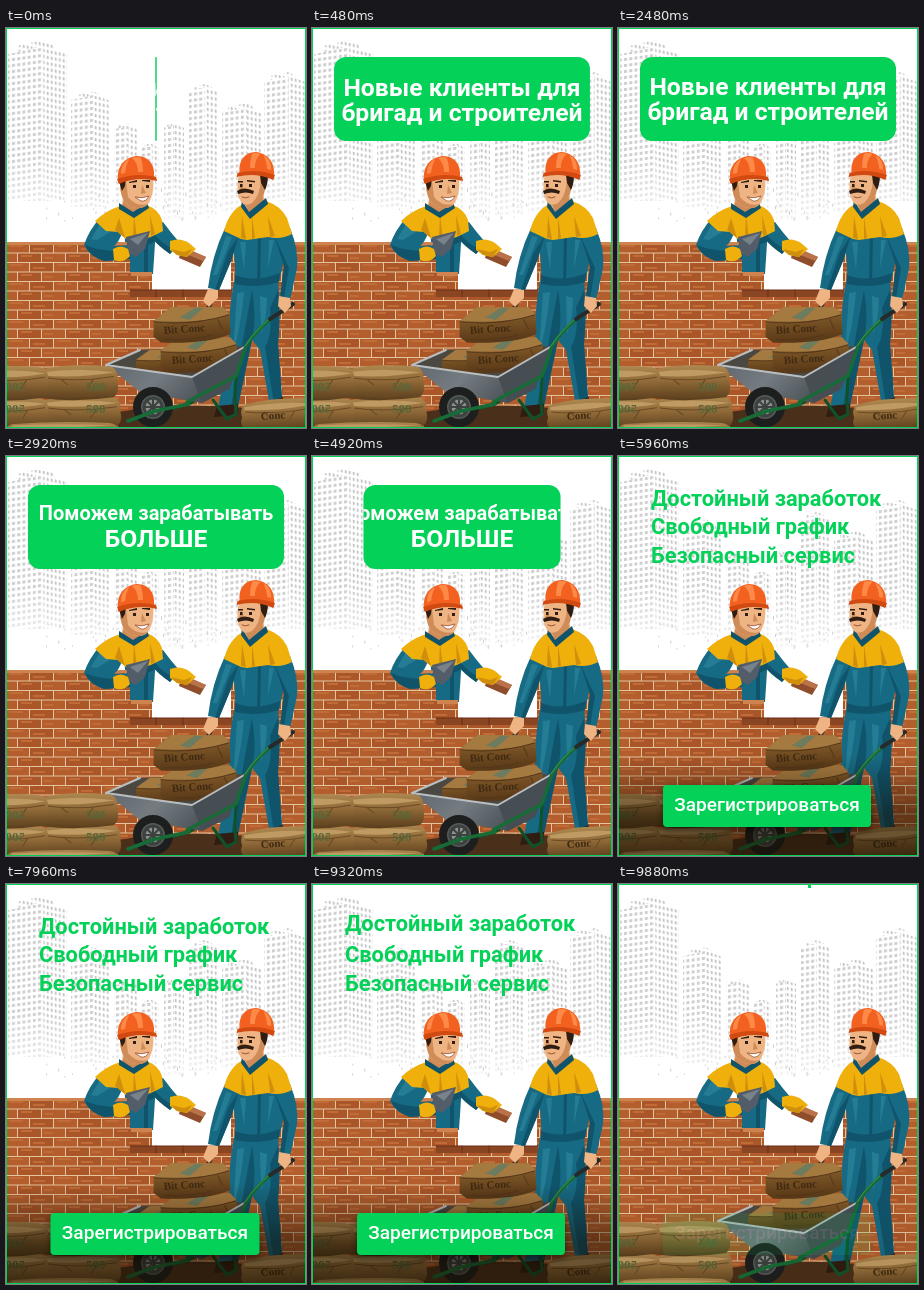
These frames come from a looping animation (300 by 400 pixels, 9920 ms). An HTML page:

```html
<!DOCTYPE html>
<html lang="ru">
<head>
<meta charset="utf-8">
<title>Новые клиенты для бригад</title>
<style>
  :root { --green: #03d158; --loop: 9920ms; }
  html, body { margin: 0; width: 100%; height: 100%; overflow: hidden; background: #fff; }
  #stage { position: relative; width: 300px; height: 400px; overflow: hidden; font: 700 21.8px/28px Roboto, sans-serif; }
  #stage > *, .strip p { position: absolute; margin: 0; white-space: nowrap; }
  svg { left: 0; top: 0; }
  .frame { inset: 0; border: 1px solid var(--green); }

  .line { left: 33px; color: var(--green); animation: line var(--loop) linear infinite backwards; }
  @keyframes line {
    0%, 51.78% { transform: translateY(335px); animation-timing-function: cubic-bezier(.333, .667, .667, 1); }
    57.83% { transform: none; animation-timing-function: linear; }
    93.3% { transform: none; animation-timing-function: cubic-bezier(.333, 0, .667, .333); }
    99.35%, 100% { transform: translateY(-245px); }
  }

  .panel { left: 22px; top: 29px; width: 256px; height: 84px; color: #fff; background: var(--green); text-align: center;
    animation: panel var(--loop) cubic-bezier(.215, .61, .355, 1) infinite; }
  @keyframes panel {
    0%, 54.23%, 100% { clip-path: inset(0 128px round 12px); visibility: hidden; }
    5.04%, 49.19% { clip-path: inset(0 0 round 12px); visibility: visible; }
  }
  .strip { height: 168px; animation: strip var(--loop) ease-in-out infinite; }
  .strip p { width: 256px; font-size: 24.7px; line-height: 25px; }
  .strip small { font-size: 20px; }
  @keyframes strip {
    0%, 24.6% { transform: none; }
    29.44%, 100% { transform: translateY(-84px); }
  }

  .shade { inset: 300px 0 0; background: linear-gradient(transparent, rgba(20, 12, 0, .5) 60%);
    animation: shade var(--loop) linear infinite; }
  @keyframes shade {
    0%, 53.02%, 100% { opacity: 0; }
    59.07%, 96.37% { opacity: 1; }
  }
  .button { left: 45px; top: 329px; width: 208px; height: 42px; border-radius: 4px; color: #fff; background: var(--green);
    font-weight: 500; font-size: 19px; line-height: 39px; text-align: center; box-shadow: 0 3px 7px rgba(0, 0, 0, .45);
    animation: button var(--loop) linear infinite; }
  @keyframes button {
    0%, 53.02% { transform: translateY(335px); animation-timing-function: cubic-bezier(.333, .667, .667, 1); }
    59.07% { transform: none; }
    79.84% { transform: none; animation-timing-function: ease-in-out; }
    81.85% { transform: scale(1.06); animation-timing-function: ease-in-out; }
    83.87%, 96.37% { transform: none; opacity: 1; }
    100% { transform: none; opacity: 0; }
  }

  .blue { fill: #176a83; } .navy { fill: #10546c; } .teal { fill: #247d94; }
  .yellow { fill: #efb00c; } .amber { fill: #cf8f0c; }
  .skin { fill: #efb483; } .tan { fill: #cf8c58; } .hair { fill: #2f1c12; }
  .hat { fill: #f2611f; } .hatDark { fill: #d04a12; } .hatLight { fill: #ff8a48; }
  .stroke { fill: none; stroke-linecap: round; stroke-linejoin: round; }
  .label { font: 700 11px "Liberation Serif", serif; fill: #3f2a12; }
  .mark { font: 700 13px "Liberation Serif", serif; fill: #55683a; }
</style>
</head>
<body>
<div id="stage">
  <svg width="300" height="400">
    <defs>
      <pattern id="win" width="5.2" height="6" patternUnits="userSpaceOnUse" patternTransform="skewY(-8)">
        <path d="M.8 1h3v3H.8z" fill="#cfcfcf"/>
      </pattern>
      <pattern id="winSide" width="4" height="6" patternUnits="userSpaceOnUse" patternTransform="skewY(12)">
        <path d="M.7 1h2v3.2H.7z" fill="#c6c6c6"/>
      </pattern>
      <linearGradient id="mist" x2="0" y2="1">
        <stop offset="0" stop-color="#fff" stop-opacity="0"/><stop offset="1" stop-color="#fff"/>
      </linearGradient>
    </defs>
    <g id="towers"></g>
    <path d="M0 130h300v75H0z" fill="url(#mist)"/>
    <g id="specks" fill="#d0d0d0"></g>
  </svg>

  <div class="line" style="top:29px">Достойный заработок</div>
  <div class="line" style="top:57px;animation-delay:140ms">Свободный график</div>
  <div class="line" style="top:86px;animation-delay:227ms">Безопасный сервис</div>

  <svg width="300" height="400">
    <defs>
      <pattern id="brick" width="48" height="19" patternUnits="userSpaceOnUse" y="215">
        <path d="M0 0h48v19H0z" fill="#e3c49c"/>
        <path d="M0 1h23v8.4H0zM0 10.5h11v8.4H0zM36 10.5h12v8.4H36z" fill="#b45e2e"/>
        <path d="M24 1h23v8.4H24zM12 10.5h23v8.4H12z" fill="#ab5629"/>
        <path d="M3 2h14v2H3zM27 5h12v2H27zM15 12h11v2H15zM38 14h9v2h-9z" fill="#bf6c39"/>
      </pattern>
      <linearGradient id="steel" x2="1" y2=".4">
        <stop offset="0" stop-color="#596067"/><stop offset=".5" stop-color="#747b81"/><stop offset="1" stop-color="#41484e"/>
      </linearGradient>
      <linearGradient id="sack" x2="0" y2="1">
        <stop offset="0" stop-color="#ae8850"/><stop offset=".45" stop-color="#906a38"/><stop offset="1" stop-color="#593d1c"/>
      </linearGradient>
      <linearGradient id="darkSack" x2="0" y2="1">
        <stop offset="0" stop-color="#91662f"/><stop offset="1" stop-color="#573717"/>
      </linearGradient>
      <g id="helmet">
        <path class="hat" d="M1 23C0 10 8 1 20 0C32 0 38 9 37 20L40 24Q22 20 1 27z"/>
        <path class="hatDark" d="M0 23Q20 16 39 21L40 25Q20 20 2 28z"/>
        <path class="hatLight" d="M15 2Q21 0 24 2Q26 8 26 16L21 16Q21 7 15 2zM6 9Q8 5 12 3Q9 9 8 17L4 18Q4 12 6 9z"/>
      </g>
      <g id="bag">
        <path d="M4 4Q30-3 56 2Q61 5 60 16Q62 27 57 31Q30 36 4 32Q-2 26 1 18Q-1 8 4 4z" fill="url(#sack)"/>
        <path d="M3 7Q30 2 58 7Q32 13 3 10z" fill="#bf9a62"/>
        <path class="stroke" d="M4 12Q30 17 57 11M10 28Q28 32 48 28M18 14l5 5M42 14l-4 8" stroke="#6b4b25"/>
      </g>
      <g id="crate">
        <path d="M2 14L20 1L72 4L78 11L78 31Q54 40 8 36L1 30z" fill="url(#darkSack)"/>
        <path d="M2 14L20 1L72 4L78 11Q55 20 2 14z" fill="#a57a40"/>
        <path class="stroke" d="M2 15Q40 21 77 12M12 33Q40 36 60 31M66 16l4 10" stroke="#54371a"/>
        <path d="M28 12L44 3L52 4L38 15z" fill="#6d7b5e"/>
      </g>
    </defs>

    <!-- left mason, behind the wall -->
    <path class="blue" d="M118 202L150 200L147 246H122z"/>
    <path class="navy" d="M118 206Q134 218 149 206L148 214Q134 222 121 215zM138 216h4v30h-4z"/>
    <path d="M0 215H124V244H146V262H225V215H300V400H0z" fill="url(#brick)"/>
    <path d="M0 214H123V217H0zM284 214H300V217H284zM125 244H146V248H125z" fill="#cf8450"/>
    <path d="M124 262H226V269H124z" fill="#8a4522"/>
    <path class="stroke" d="M124 262H226M150 262v7M177 262v7M204 262v7" stroke="#6d2d18"/>
    <g>
      <path class="skin" d="M118 168L142 172L141 184L128 190L115 180z"/>
      <path class="tan" d="M118 170Q128 182 142 177L140 184L127 187L116 180z"/>
      <path class="blue" d="M94 190L116 205Q113 214 108 218L126 217L124 231L98 233Q83 228 78 217Q83 202 94 190z"/>
      <path class="navy" d="M79 217Q98 225 125 222L124 231L98 233Q83 228 79 217z"/>
      <path class="teal" d="M94 196L104 204L91 212L85 211z"/>
      <path class="blue" d="M145 196L157 194Q165 205 174 215L164 226Q153 216 145 208z"/>
      <path class="navy" d="M146 203Q156 217 168 221L164 226Q152 218 146 210z"/>
      <path class="yellow" d="M89 193Q99 183 114 178L127 185L141 177Q153 182 156 192L157 203L149 207Q136 214 120 211L112 204L100 203z"/>
      <path class="amber" d="M113 190L119 210L115 207L109 202zM144 187L149 206L145 208zM128 187L131 211L127 211z"/>
      <path class="navy" d="M113 175L127 184L141 175L143 180L128 190L113 181z"/>
      <path class="skin" d="M114 152Q113 170 122 177Q131 183 140 178Q149 169 147 148L118 145z"/>
      <path class="tan" d="M114 155L120 153L122 169Q130 179 142 176Q133 184 122 177Q114 171 114 155zM136 157l4 8l-5 1z"/>
      <path class="hair" d="M112 150L120 149L119 158L116 163zM123 154l8-2v2l-8 1zM136 152l8 0v2l-8-1zM127 157h3v3h-3zM140 157h3v3h-3z"/>
      <path d="M129 169Q136 171 143 168Q140 174 135 173z" fill="#fff" stroke="#9b5033" stroke-width=".8"/>
      <use href="#helmet" x="111" y="128"/>
      <path d="M120 209L144 203L139 221L130 229L122 225z" fill="#535d69"/><path d="M124 211L142 205L132 217z" fill="#78828b"/>
      <path class="yellow" d="M107 221Q115 216 122 221L124 228Q117 236 108 232z"/>
      <path d="M176 219L200 229L194 239L173 230z" fill="#8f4d2c"/><path d="M178 219L200 229L197 233L175 224z" fill="#b97249"/>
      <path class="yellow" d="M164 213Q174 209 183 215L190 221L181 229L171 227L164 222z"/>
      <path class="amber" d="M165 221L178 224L186 221L181 229L171 227z"/>
    </g>

    <path d="M112 384Q170 374 240 380V400H112z" fill="#4a2f1a"/>

    <!-- right worker -->
    <g>
      <path class="blue" d="M229 250L272 250Q275 284 272 316L276 370L264 378L254 322L246 312L232 378L212 380L223 322Q222 280 229 250z"/>
      <path class="navy" d="M246 262Q251 292 246 312L232 378L225 379L238 306zM264 280Q267 306 259 319L268 376L276 370L272 316Q275 283 272 262z"/>
      <path class="teal" d="M231 265L238 264Q235 299 227 325zM254 268L261 270Q261 290 255 306z"/>
      <path class="hair" d="M211 378L232 376L231 387L208 389zM264 374L277 369L277 381L262 384z"/>
      <path class="blue" d="M225 196L280 194Q282 216 273 254Q252 261 229 256Q230 235 225 196z"/>
      <path class="navy" d="M252 208L255 208L254 258L251 258zM229 247Q250 255 274 245L273 254Q252 261 229 256z"/>
      <path class="teal" d="M234 214L240 214L238 242zM263 212L268 212L262 240z"/>
      <path class="skin" d="M237 168L257 164L260 178L243 188z"/><path class="tan" d="M239 174L257 169L257 178L243 185z"/>
      <path class="blue" d="M219 200L235 204L225 233L213 262L202 260Q206 227 219 200z"/>
      <path class="teal" d="M220 208L226 209L211 247L207 247z"/>
      <path class="navy" d="M233 207L225 233L213 262L209 262L222 224z"/>
      <path class="blue" d="M268 202L284 200Q293 222 291 240L284 272L274 270L278 238z"/>
      <path class="navy" d="M268 207L278 238L274 270L278 271L283 240z"/>
      <path class="yellow" d="M218 203Q223 183 237 176L243 186L260 173Q275 178 281 190L286 206Q275 212 262 209L241 212L235 211z"/>
      <path class="amber" d="M236 188L240 211L235 210zM262 188L269 208L264 209zM246 188L249 210L246 211z"/>
      <path class="navy" d="M236 172L243 184L260 170L262 176L244 191L235 179z"/>
      <path class="skin" d="M232 150Q230 167 235 174Q242 181 250 176Q259 167 261 147L240 143z"/>
      <path class="tan" d="M261 150L255 152Q254 168 246 175Q241 178 237 176Q244 182 251 176Q260 168 261 150zM236 155l-3 7l5 1z"/>
      <path class="hair" d="M262 147L254 147L255 155L259 162Q262 156 262 147zM231 163Q238 158 248 163L247 166Q240 163 232 166zM232 153l5 0v1.5l-5 0zM241 152l8 1v1.5l-8-1zM234 156h2.5v3H234zM243 156h3v3h-3z"/>
      <path class="stroke" d="M236 169Q239 171 243 169" stroke="#9b5033"/>
      <use href="#helmet" transform="translate(269 124) scale(-.96 1)"/>
    </g>

    <!-- barrow -->
    <path class="stroke" d="M208 270L196 290" stroke="#252a2b" stroke-width="4"/>
    <path class="skin" d="M202 261L212 262L212 270L203 279L197 273z"/>
    <path class="stroke" d="M236 325Q226 355 230 386L221 391L207 372M122 393L183 376L215 358" stroke="#0f5229" stroke-width="3"/>
    <path d="M100 337L134 322L240 318L222 361L195 374L134 362z" fill="#4b4842"/>
    <g transform="translate(128 322) rotate(-3) scale(.8 .7)"><use href="#crate"/></g>
    <g transform="translate(152 309) rotate(-3)"><use href="#crate"/></g>
    <g transform="translate(145 279) rotate(-3)"><use href="#crate"/></g>
    <text class="label" transform="translate(158 306) rotate(-4)">Bit Conc</text>
    <text class="label" transform="translate(166 336) rotate(-4)">Bit Conc</text>
    <path d="M100 337L186 349L240 318L223 361L196 375L134 364z" fill="url(#steel)"/>
    <path d="M186 349L240 318L223 361L196 375z" fill="#464d53"/>
    <path class="stroke" d="M134 322L100 337L186 349L240 318" stroke="#b9bec0" stroke-width="2"/>
    <path class="stroke" d="M181 374L230 348L240 318Q252 299 274 284" stroke="#176b37" stroke-width="3.5"/>
    <path class="stroke" d="M239 318Q251 299 272 284" stroke="#3f9d5c"/>
    <path class="stroke" d="M264 291L287 276" stroke="#252a2b" stroke-width="4"/>
    <path class="skin" d="M273 268L284 270L285 278L279 285L272 278z"/>
    <circle cx="147" cy="379" r="16" fill="#555a58" stroke="#1d1f1e" stroke-width="8"/>
    <circle cx="147" cy="379" r="9" fill="#8d918c" stroke="#3c423f" stroke-width="3"/>
    <path d="M139 379h16M147 371v16M141 373l12 12M153 373l-12 12" stroke="#3c423f" stroke-width="2"/>
    <path class="stroke" d="M122 393L149 383L183 376" stroke="#176b37" stroke-width="3.5"/>

    <!-- sack piles -->
    <g transform="translate(34 368) scale(1.34 .98)"><use href="#bag"/></g>
    <g transform="translate(-27 369) scale(1.15 .98)"><use href="#bag"/></g>
    <g transform="translate(31 337) scale(1.34 1.04)"><use href="#bag"/></g>
    <g transform="translate(-30 338) scale(1.2 1.02)"><use href="#bag"/></g>
    <g transform="translate(0 394) scale(1.85 .5)"><use href="#bag"/></g>
    <g transform="translate(234 373) rotate(-3) scale(1.28 .94)"><use href="#bag"/></g>
    <text class="mark" x="80" y="363">500</text><text class="mark" x="80" y="385">500</text>
    <text class="mark" transform="translate(19 363) scale(-1 1)">500</text>
    <text class="mark" transform="translate(19 385) scale(-1 1)">500</text>
    <text class="label" transform="translate(255 392) rotate(-4)">Conc</text>
  </svg>

  <div class="panel"><div class="strip">
    <p style="top:18px">Новые клиенты для<br>бригад и строителей</p>
    <p style="top:98px"><small>Поможем зарабатывать</small><br>БОЛЬШЕ</p>
  </div></div>
  <div class="shade"></div>
  <div class="frame"></div>
  <div class="button">Зарегистрироваться</div>
</div>
<script>
  // left, top, width, height, share of the front face
  const towers = [
    [135, 117, 18, 75, .6], [108, 98, 24, 80, .6], [158, 97, 20, 95, .5],
    [216, 79, 40, 105, .62], [183, 59, 29, 128, .55], [65, 67, 38, 112, .6],
    [2, 18, 59, 155, .6], [258, 48, 41, 125, .6]
  ];
  const face = (points, fill) => `<polygon points="${points}" fill="${fill}"/>`;
  const tower = ([x, y, w, h, share]) => {
    const mid = x + w * share, right = x + w, bottom = y + h, drop = w * .14;
    const front = [x, y + drop, mid, y, mid, bottom, x, bottom];
    const side = [mid, y, right, y + drop, right, bottom, mid, bottom];
    const cap = [x + w * .15, y + drop, x + w * .15, y, mid, y - w * .1, right - w * .22, y, right - w * .22, y + drop];
    return face(cap, '#fff') + face(cap, 'url(#winSide)') +
      face(front, '#fff') + face(side, '#fff') + face(front, 'url(#win)') + face(side, 'url(#winSide)');
  };
  document.getElementById('towers').innerHTML = towers.map(tower).join('');

  let seed = 7;
  const random = () => (seed = seed * 16807 % 2147483647) / 2147483647;
  document.getElementById('specks').innerHTML = Array.from({ length: 60 }, () =>
    `<rect x="${40 + random() * 235}" y="${160 + random() * 32}" width="1" height="${1 + random() * 3}"/>`).join('');
</script>
</body>
</html>
```
